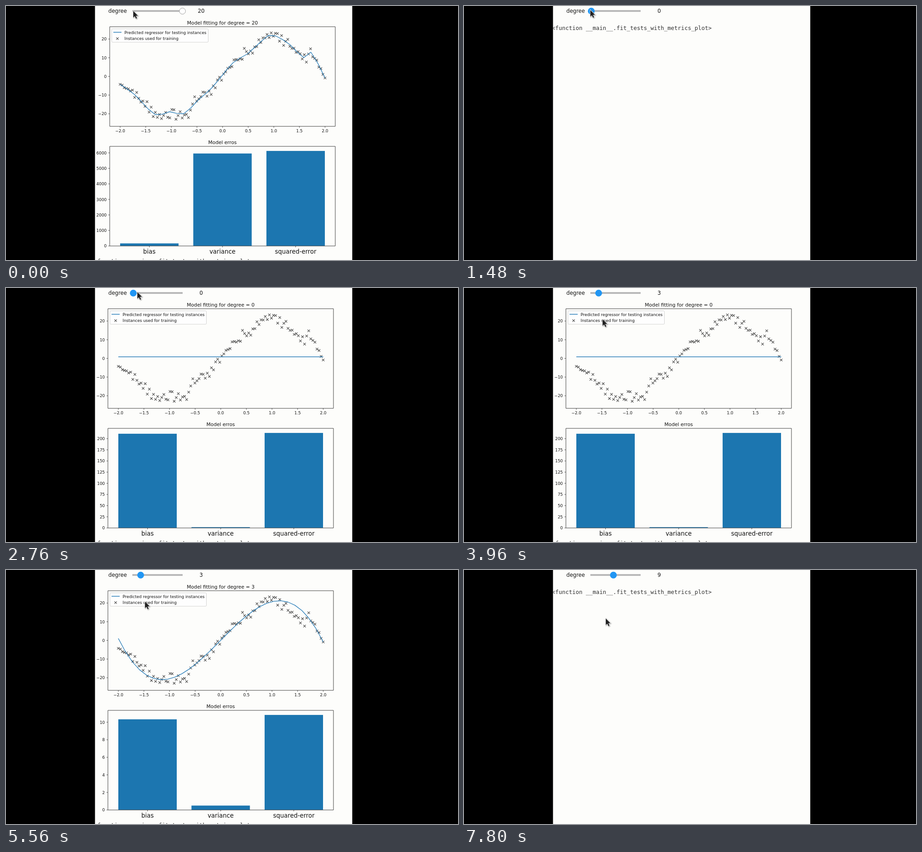
These frames come from a looping animation (998 by 561 pixels, 8000 ms). An HTML page with a canvas:

```html
<!DOCTYPE html>
<html lang="en">
<head>
<meta charset="utf-8">
<title>Model fitting</title>
<style>
html, body { margin: 0; width: 100%; height: 100%; overflow: hidden; background: #000; }
canvas { display: block; }
</style>
</head>
<body>
<canvas id="stage" width="998" height="561"></canvas>
<script>
const ctx = document.getElementById('stage').getContext('2d');
const LOOP = 8000, STEP = 40;
const SANS = '"DejaVu Sans", sans-serif';
const MONO = '"DejaVu Sans Mono", monospace';
const INK = '#3c3c3c', MARK = '#444', CURVE = '#2a7eb9', BAR = '#1c76b0';

// Turning points of the overfitted curve: [sample index, y]
const bends = [
  [0, 173], [2, 195], [5, 240], [7, 233.5], [9, 238], [11, 208.5], [13, 180.5], [16, 125],
  [18, 106], [21, 65], [22, 66], [24, 85], [26, 114], [27, 102], [29, 159]];

const valueY = v => 155.5 - v * 4.125;
const flat = () => valueY(0.85);
const cubic = u => {
  const x = 4 * u - 2;
  return valueY(0.1 + 27.7 * x - 7.045 * x ** 3);
};

// Hermite spline through the bends, u in 0..1
function wiggly(u) {
  const x = u * 29, last = bends.length - 1;
  const slope = k => {
    const a = bends[Math.max(0, k - 1)], b = bends[Math.min(last, k + 1)];
    return (b[1] - a[1]) / (b[0] - a[0]);
  };
  let i = 0;
  while (i < last - 1 && x >= bends[i + 1][0]) i++;
  const [x0, y0] = bends[i], [x1, y1] = bends[i + 1];
  const h = x1 - x0, s = (x - x0) / h, r = 1 - s;
  return y0 * r * r * (1 + 2 * s) + y1 * s * s * (3 - 2 * s)
    + h * s * r * (r * slope(i) - s * slope(i + 1));
}

let seed = 11;
const random = () => (seed = (seed * 16807) % 2147483647) / 2147483647;
const marks = Array.from({ length: 100 }, (_, i) =>
  wiggly(i / 99) + (random() + random() - 1) * 17 * Math.min(1, i / 8, (99 - i) / 8));

const models = {
  20: { left: 229, fit: wiggly, bias: 165, variance: 5959, step: 1000 },
  0: { left: 225, fit: flat, bias: 211, variance: 1.8, step: 25 },
  3: { left: 225, fit: cubic, bias: 10.33, variance: 0.5, step: 2 }
};

// [start time, state]
const sliderStates = [[0, 20], [160, 0], [3360, 3], [7040, 9]];
const plotStates = [[0, 20], [780, null], [2670, 0], [4260, null], [5390, 3], [7780, null]];
// [time, x, y]
const pointer = [
  [0, 281, 11], [1480, 279, 9], [2480, 279, 9], [2760, 290, 9], [3400, 297, 10],
  [3880, 306, 69], [6160, 307, 70], [6680, 328, 10], [7080, 330, 10], [7640, 313, 107],
  [LOOP, 313, 107]];

const stateAt = (list, t) => list.filter(s => s[0] <= t).pop()[1];

function pointerAt(t) {
  const i = pointer.findIndex(p => p[0] > t);
  const [t0, x0, y0] = pointer[i - 1], [t1, x1, y1] = pointer[i];
  const u = (t - t0) / (t1 - t0), e = u * u * (3 - 2 * u);
  return [x0 + (x1 - x0) * e, y0 + (y1 - y0) * e];
}

function text(s, x, y, size, align = 'left', family = SANS, color = '#111') {
  ctx.font = size + 'px ' + family;
  ctx.textAlign = align;
  ctx.fillStyle = color;
  ctx.fillText(s, x, y);
}

function line(points, color, width) {
  ctx.beginPath();
  points.forEach(p => ctx.lineTo(p[0], p[1]));
  ctx.strokeStyle = color;
  ctx.lineWidth = width;
  ctx.stroke();
}

function cross(x, y) {
  const r = 2.7;
  line([[x - r, y - r], [x + r, y + r]], MARK, 1.1);
  line([[x - r, y + r], [x + r, y - r]], MARK, 1.1);
}

function frameBox(x, y) {
  ctx.strokeStyle = INK;
  ctx.lineWidth = 1;
  ctx.strokeRect(x, y, 498, 220);
}

const label = v => String(v).replace('-', '\u2212');

function yTick(left, y, v) {
  line([[left - 3, y], [left, y]], INK, 0.9);
  text(label(v), left - 6.7, y + 3.4, 8.95, 'right');
}

function legend(x) {
  ctx.beginPath();
  ctx.roundRect(x + 4.5, 50.5, 213, 29.5, 2);
  ctx.fillStyle = 'rgba(255,255,255,.8)';
  ctx.fill();
  ctx.strokeStyle = '#d2d2d2';
  ctx.lineWidth = 1;
  ctx.stroke();
  line([[x + 8, 58], [x + 26, 58]], CURVE, 1.35);
  cross(x + 17, 72);
  text('Predicted regressor for testing instances', x + 32.5, 61.5, 8.93);
  text('Instances used for training', x + 32.5, 75.2, 8.93);
}

function drawFit(degree, { left, fit }) {
  const px = u => left + 23 + 452.4 * u;
  text('Model fitting for degree = ' + degree, left + 249, 41, 10.75, 'center');
  marks.forEach((y, i) => cross(px(i / 99), y));
  ctx.lineJoin = 'round';
  line(Array.from({ length: 30 }, (_, i) => [px(i / 29), fit(i / 29)]), CURVE, 1.35);
  frameBox(left, 45.8);
  for (let v = -20; v <= 20; v += 10) yTick(left, valueY(v), v);
  for (let i = 0; i <= 8; i++) {
    const x = px(i / 8);
    line([[x, 265.8], [x, 268.8]], INK, 0.9);
    text(label((i / 2 - 2).toFixed(1)), x, 279.3, 8.95, 'center');
  }
  legend(left);
}

function drawErrors({ left, bias, variance, step }) {
  const total = bias + variance, scale = 209.9 / total;
  text('Model erros', left + 249, 305.3, 10.75, 'center');
  Object.entries({ bias, variance, 'squared-error': total }).forEach(([name, v], i) => {
    const x = left + 23 + i * 161.5, c = x + 64.5;
    ctx.fillStyle = BAR;
    ctx.fillRect(x, 530 - v * scale, 129, v * scale);
    line([[c, 530], [c, 533]], INK, 0.9);
    text(name, c, 547.3, 13.4, 'center');
  });
  frameBox(left, 310);
  for (let v = 0; v <= total * 1.05; v += step) yTick(left, 530 - v * scale, v);
}

function drawSlider(value) {
  text('degree', 226, 15, 11.7);
  text(value, 431, 15, 11.7, 'center');
  ctx.fillStyle = '#b9b9b9';
  ctx.fillRect(279, 9, 111, 4);
  const idle = value === 20;
  ctx.beginPath();
  ctx.arc(281 + value * 5.43, 11.3, idle ? 6.8 : 7.5, 0, Math.PI * 2);
  ctx.fillStyle = idle ? '#fff' : '#2196f3';
  ctx.fill();
  if (idle) {
    ctx.strokeStyle = '#9c9c9c';
    ctx.lineWidth = 1;
    ctx.stroke();
  }
}

function drawPointer(x, y) {
  ctx.save();
  ctx.translate(x, y);
  ctx.beginPath();
  [[0, 0], [0, 14.5], [3.4, 11.4], [5.8, 17], [8.2, 16], [5.8, 10.6], [10.4, 10.4]]
    .forEach(p => ctx.lineTo(p[0], p[1]));
  ctx.closePath();
  ctx.shadowColor = 'rgba(0,0,0,.35)';
  ctx.shadowBlur = 2;
  ctx.shadowOffsetX = ctx.shadowOffsetY = 1;
  ctx.strokeStyle = '#eee';
  ctx.lineWidth = 1.6;
  ctx.stroke();
  ctx.shadowColor = 'transparent';
  ctx.fillStyle = '#222';
  ctx.fill();
  ctx.restore();
}

function draw(t) {
  ctx.fillStyle = '#000';
  ctx.fillRect(0, 0, 998, 561);
  ctx.save();
  ctx.beginPath();
  ctx.rect(196.5, 0, 568, 561);
  ctx.clip();
  ctx.fillStyle = '#fdfdfb';
  ctx.fillRect(196, 0, 569, 561);

  const degree = stateAt(plotStates, t), model = models[degree];
  drawSlider(stateAt(sliderStates, t));
  if (model) {
    drawFit(degree, model);
    drawErrors(model);
  }
  text('<function __main__.fit_tests_with_metrics_plot>', 194, model ? 567.5 : 52.5,
    12.48, 'left', MONO, '#303030');
  drawPointer(...pointerAt(t));
  ctx.restore();
}

const start = performance.now();
function tick() {
  const t = (performance.now() - start) % LOOP;
  draw(Math.floor(t / STEP) * STEP);
  requestAnimationFrame(tick);
}
tick();
</script>
</body>
</html>
```
